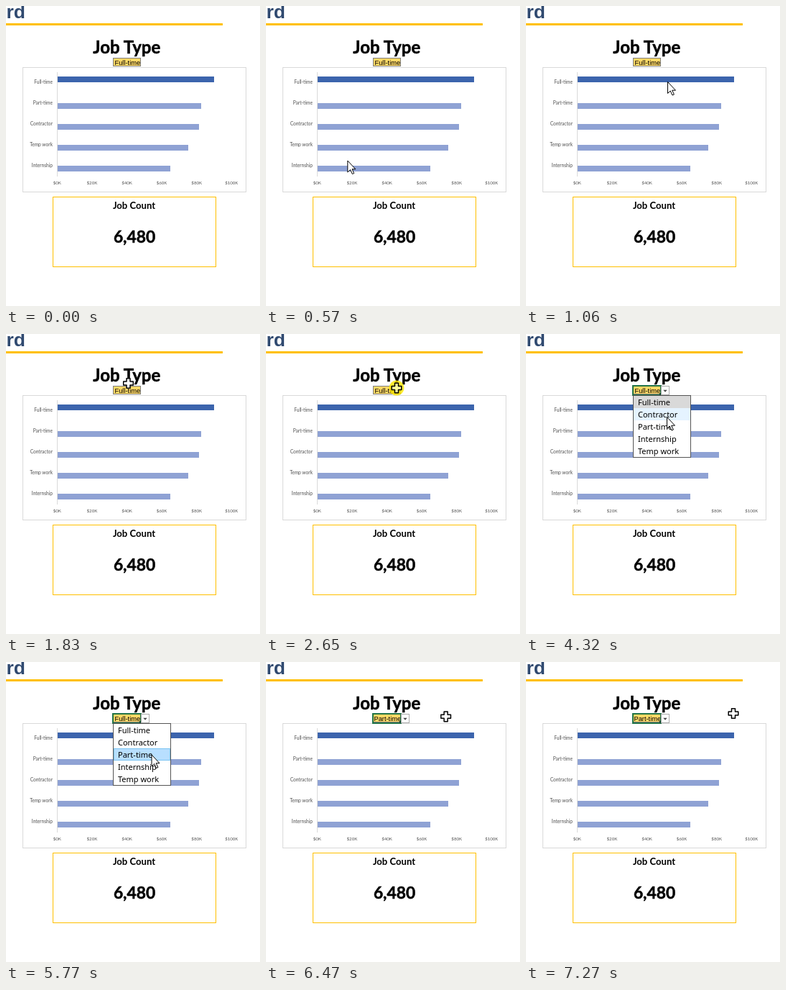
An HTML page for the animation above (8 s loop, 354x417 px).

```html
<!DOCTYPE html>
<html lang="en">
<head>
<meta charset="utf-8">
<title>Job Type dashboard</title>
<style>
  html, body { margin: 0; width: 100%; height: 100%; overflow: hidden; background: #fff; }
  svg { display: block; width: 354px; height: 417px; font-family: Lato, sans-serif; }
  .bold { font-weight: 700; text-anchor: middle; }
  .heavy { stroke: #000; stroke-width: .5px; }
  .labels { font-size: 6.6px; fill: #505050; text-anchor: end; }
  .ticks { font-size: 6.1px; fill: #505050; text-anchor: middle; }
  #cellText { font: 9.3px "Liberation Sans", Arial, sans-serif; text-anchor: middle; }
  #items { font: 11px "Noto Sans", sans-serif; }
  #cursor path { stroke: #000; stroke-linejoin: round; }
</style>
</head>
<body>
<svg viewBox="0 0 354 417">
  <text x="27" y="17" text-anchor="end" font-family="Liberation Sans, Arial, sans-serif" font-weight="700" font-size="26.5" fill="#304a70">rd</text>
  <rect y="24" width="302" height="3" fill="#ffc000"/>
  <text class="bold heavy" x="168.3" y="66" font-size="24">Job Type</text>

  <rect x="23.5" y="85.5" width="311" height="173" fill="#fff" stroke="#d9d9d9"/>
  <path d="M71.5 92V237" stroke="#d9d9d9"/>
  <g id="bars"></g>
  <g id="labels" class="labels"></g>
  <g id="ticks" class="ticks"></g>

  <rect x="65.5" y="265.5" width="227" height="97" fill="none" stroke="#ffc000"/>
  <text class="bold" x="178.5" y="282" font-size="13.1">Job Count</text>
  <text class="bold heavy" x="179" y="329" font-size="22.8">6,480</text>

  <clipPath id="cellClip"><rect x="150" y="72" width="37.5" height="14"/></clipPath>
  <rect x="149.5" y="72.5" width="38" height="11" fill="#ffd966" stroke="#7f7f7f"/>
  <text id="cellText" x="169.3" y="82" clip-path="url(#cellClip)"></text>
  <g id="selection">
    <rect x="149" y="72" width="39" height="13" fill="none" stroke="#217346" stroke-width="2"/>
    <rect x="186" y="82" width="3" height="3" fill="#174d30"/>
    <rect x="188.5" y="72.5" width="11" height="12" fill="#fff" stroke="#ababab"/>
    <path d="M191.3 77.7h5.4l-2.7 3z" fill="#444"/>
  </g>

  <g id="list">
    <rect x="149.5" y="85.5" width="80" height="86" fill="#fff" stroke="#555"/>
    <rect id="current" x="150" y="86" width="79" height="17" fill="#d9d9d9"/>
    <rect id="hover" x="150.5" width="78" height="16"/>
    <g id="items"></g>
  </g>

  <g id="cursor">
    <circle id="press" r="10.5" fill="#ffea00" fill-opacity=".8"/>
    <path id="arrow" d="M.5 .5V16.5L4.2 13L7 19L9.4 18L6.7 12.2H11.5Z"/>
    <path id="plus" stroke-width="1.5" d="M-2.5-6.8h5v4.3h4.3v5h-4.3v4.3h-5v-4.3h-4.3v-5h4.3z"/>
    <path id="hand" d="M-1.5 13V1.7Q-1.5 .5 0 .5T1.5 1.7V7.5Q3 6 4.5 8Q6 7 7.5 9Q10 8 10 10.5V15Q10 17 8 19V21H0V19Q-3 16-5 12.5Q-5 10-3 11ZM1.5 7.5v4M4.5 8v4M7.5 9v3.5"/>
  </g>
</svg>
<script>
const LOOP = 8000, ROW = 17, LIST_TOP = 86;
const ENTER = 210, ENTERED = 1060, SELECT = 2720, OPEN = 3500, PICK = 5600, CLOSE = 6270;

const $ = id => document.getElementById(id);
const show = (id, on) => $(id).setAttribute('display', on ? 'inline' : 'none');
const set = (id, attrs) => Object.entries(attrs).forEach(([k, v]) => $(id).setAttribute(k, v));
const text = (x, y, s) => `<text x="${x}" y="${y}">${s}</text>`;
const fill = (id, list, draw) => { $(id).innerHTML = list.map(draw).join(''); };

const bars = { 'Full-time': 218, 'Part-time': 200, 'Contractor': 197, 'Temp work': 182, 'Internship': 157 };
fill('bars', Object.values(bars), (width, i) =>
  `<rect x="72" y="${i ? 106 + 29 * i : 98}" width="${width}" height="8" fill="${i ? '#8fa2d4' : '#3c64ad'}"/>`);
fill('labels', Object.keys(bars), (name, i) => text(65, 107.7 + 29.1 * i, name));
fill('ticks', [0, 1, 2, 3, 4, 5], i => text(71.3 + 48.6 * i, 247.8, `$${20 * i}K`));
fill('items', ['Full-time', 'Contractor', 'Part-time', 'Internship', 'Temp work'],
  (name, i) => text(156, LIST_TOP + 13 + ROW * i, name));

// The pointer sweeps in along a curve, then glides from stop to stop.
const stops = [
  { from: 1060, to: 1720, x: 170.5, y: 68.5 },
  { from: 1830, to: 2170, x: 179, y: 85 },
  { from: 2330, to: 2560, x: 182, y: 75 },
  { from: 2700, to: 3220, x: 193, y: 80 },
  { from: 3820, to: 4320, x: 196, y: 115 },
  { from: 4880, to: 5040, x: 202, y: 134 },
  { from: 5470, to: 5600, x: 202.5, y: 128.5 },
  { from: 5770, to: 6260, x: 239, y: 76 },
  { from: 6280, to: 6830, x: 281, y: 75.5 },
  { from: 7190, to: 7270, x: 289, y: 71.5 }
];
const progress = (t, from, to) => Math.min(1, Math.max(0, (t - from) / (to - from)));
const smooth = u => u * u * (3 - 2 * u);
const easeOut = u => 1 - (1 - u) ** 2;
const bezier = (u, a, b, c, d) => {
  const v = 1 - u;
  return a * v ** 3 + 3 * b * v * v * u + 3 * c * v * u * u + d * u ** 3;
};

function pointer(t) {
  const u = easeOut(progress(t, ENTER, ENTERED));
  let x = bezier(u, 346, 190, 0, 197), y = bezier(u, 407, 220, 270, 105);
  for (const stop of stops) {
    const k = smooth(progress(t, stop.from, stop.to));
    x += (stop.x - x) * k;
    y += (stop.y - y) * k;
  }
  return { x, y };
}

const clicks = [SELECT - 70, OPEN, PICK + 60];

function draw(t) {
  const { x, y } = pointer(t);
  const open = t >= OPEN && t < CLOSE, picked = t >= PICK;
  const pressed = clicks.some(click => Math.abs(t - click) < 80);

  show('selection', t >= SELECT);
  $('cellText').textContent = t >= CLOSE ? 'Part-time' : 'Full-time';

  const row = picked ? 2 : Math.floor((y - LIST_TOP) / ROW);
  show('list', open);
  show('current', open && !picked);
  show('hover', open && row > 0);
  set('hover', {
    y: LIST_TOP + .5 + ROW * row,
    fill: picked ? '#b8dfff' : '#e5f3ff',
    stroke: picked ? '#7cc4f2' : '#e5f3ff'
  });

  const overButton = t >= SELECT && x > 187 && x < 200 && y < 84.5;
  const overChart = y > 84.5 && y < 258 && x > 23 && x < 335;
  const shape = overButton ? 'hand' : open || overChart ? 'arrow' : 'plus';
  show('cursor', t >= ENTER);
  show('press', pressed);
  for (const id of ['arrow', 'plus', 'hand']) show(id, id === shape);
  set('cursor', { fill: pressed ? '#ffff9c' : '#fff', transform: `translate(${x} ${y})` });
}

const start = performance.now();
function frame() {
  draw((performance.now() - start) % LOOP);
  requestAnimationFrame(frame);
}
frame();
</script>
</body>
</html>
```
